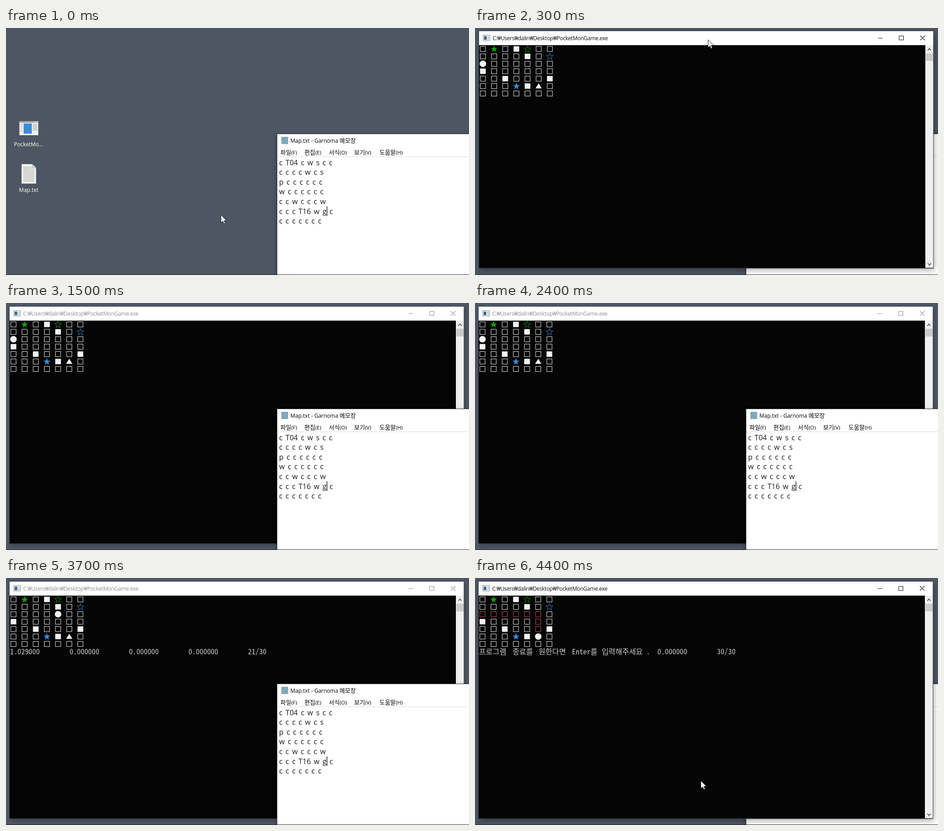
Animation, 1024 px wide and 547 px high, one loop 4500 ms. Source, as an HTML page:

```html
<!DOCTYPE html>
<html lang="ko">
<head>
<meta charset="utf-8">
<title>Map walk</title>
<style>
  html, body { margin: 0; width: 100%; height: 100%; overflow: hidden; background: #4d5662; }
  svg { display: block; width: 100vw; height: 100vh; }
  text { white-space: pre; font: 12px "Open Sans", "Noto Sans", "Noto Sans CJK KR", sans-serif; }
  .ko { font: 13px "Noto Sans CJK KR", "Noto Sans CJK", sans-serif; }
  .label { fill: #fff; text-anchor: middle; }
  .path { letter-spacing: -.3px; }
  .note { font-size: 16px; word-spacing: 2.55px; fill: #1a1a1a; }
  .term { font: 16.44px "Noto Sans Mono CJK KR", "Noto Sans CJK KR", "Noto Sans CJK", monospace; fill: #ccc; }
</style>
</head>
<body>
<svg viewBox="0 0 1024 547" preserveAspectRatio="none">
  <defs>
    <filter id="soft" x="-10%" y="-10%" width="120%" height="120%"><feGaussianBlur stdDeviation="7"/></filter>
    <filter id="tight" x="-10%" y="-10%" width="120%" height="120%"><feGaussianBlur stdDeviation="4"/></filter>
  </defs>
  <rect width="1024" height="547" fill="#4d5662"/>
  <g id="desktop"></g>
  <g id="stack">
    <g id="console">
      <rect id="shade" x="11" y="13" width="1004" height="524"/>
      <rect x="7.5" y="7.5" width="1005.5" height="525.5" fill="#050505" stroke="#3c434c"/>
      <rect x="8" y="8" width="1004.5" height="31" fill="#fff"/>
      <g id="bar">
        <text class="path" x="38" y="28" fill="currentColor">C:₩Users₩dalin₩Desktop₩PocketMonGame.exe</text>
        <path d="M890.5 23.5h10M937 18.5h9.5v9h-9.5zM984 18l10 10m0-10l-10 10" fill="none" stroke="currentColor" stroke-width="1.1"/>
      </g>
      <rect x="17" y="16.5" width="15" height="12.5" fill="#eee" stroke="#8b8f93"/>
      <rect x="19" y="19" width="6" height="8" fill="#33728f"/>
      <path d="M27 20.5h3.5m-3.5 2.5h3.5m-3.5 2.5h3.5" stroke="#aaa"/>
      <rect x="995" y="39" width="17.5" height="493" fill="#efefef"/>
      <rect x="996" y="57" width="16" height="17" fill="#cbcbcb"/>
      <path d="M1000.5 50.5l3.5-4 3.5 4M1000.5 522l3.5 4 3.5-4" fill="none" stroke="#4a4a4a" stroke-width="1.8"/>
      <g id="grid"></g>
      <g id="output"></g>
    </g>
    <g id="notepad"></g>
  </g>
  <path id="cursor" d="M0 0V17.2L4 13.5 6.6 19.4 9.3 18.2 6.8 12.4H12.2Z" fill="#fff" stroke="#161a20"/>
  <rect y="546" width="1024" height="1" fill="#20242a"/>
</svg>
<script>
const LOOP = 4500, STEP = 100;
const CELL = 8.22, COL = 24.67, ROW = 16.44;
const GREEN = "#13a10e", BLUE = "#3a8fdc", RED = "#b14f59", WHITE = "#f2f2f2";
// T: filled star, s: hollow star, w: wall, g: goal, c: clear
const MAP = ["cTcwscc", "ccccwcs", "ccccccc", "wcccccc", "ccwcccw", "cccTwgc", "ccccccc"];
const NOTE = ["c T04 c w s c c", "c c c c w c s", "p c c c c c c", "w c c c c c c",
              "c c w c c c w", "c c c T16 w g c", "c c c c c c c"];
const MENU = [[607, "파일", "F"], [660, "편집", "E"], [714, "서식", "O"], [770, "보기", "V"], [826, "도움말", "H"]];
const MESSAGE = [[0, "프로그램"], [9, "종료를"], [16, "원한다면"], [25, "Enter"], [30, "를"],
                 [33, "입력해주세요"], [45, "."]];
const GOAL = 8;

const $ = id => document.getElementById(id);
const rect = (x, y, w, h, fill, more = "") =>
  `<rect x="${x}" y="${y}" width="${w}" height="${h}" fill="${fill}" ${more}/>`;
const text = (x, y, str, cls = "") => `<text x="${x}" y="${y}" class="${cls}">${str}</text>`;
const rules = (x, y, w, gap, n, color) => {
  let d = "";
  for (let i = 0; i < n; i++) d += `M${x} ${y + i * gap}h${w}`;
  return `<path d="${d}" stroke="${color}"/>`;
};

function drawDesktop() {
  $("desktop").innerHTML =
    rect(29.5, 206.5, 42, 31, "#f1f1ef", 'stroke="#8d9194"') +
    rect(30, 207, 41, 3, "#a3a7aa") +
    rect(62, 207.5, 2, 1.5, "#fff") + rect(65.5, 207.5, 2, 1.5, "#fff") + rect(69, 207.5, 2, 1.5, "#fff") +
    rect(39, 211.5, 18, 22.5, "#3b8bd6") +
    rules(31.5, 213.5, 5.5, 4, 5, "#a8a8a8") + rules(59, 213.5, 10.5, 2.6, 6, "#9a9a9a") +
    '<path d="M34.5 301.5H58L66.5 310V344.5H34.5Z" fill="#f6f6f2" stroke="#a9aaa8"/>' +
    '<path d="M58 301.5V310H66.5" fill="#d9d9d6" stroke="#a0a09d"/>' +
    rules(38, 307.5, 18, 2.9, 2, "#9c9c9c") + rules(38, 313.3, 25, 2.9, 10, "#9c9c9c") +
    text(50, 262, "PocketMo...", "label") + text(50, 363, "Map.txt", "label");
}

function drawNotepad() {
  const menu = MENU.map(([x, name, key]) =>
    `<text x="${x}" y="279.5" class="ko">${name}<tspan style="font:11.5px 'Open Sans',sans-serif">(${key})</tspan></text>`);
  $("notepad").innerHTML =
    rect(598, 236, 440, 330, "#000", 'opacity=".3" filter="url(#tight)"') +
    rect(599.5, 234.5, 440, 330, "#fff", 'stroke="#343a42"') +
    rect(609, 241, 15, 16, "#7fa9bb") +
    text(629, 254, "Map.txt - Garnoma <tspan class='ko'>메모장</tspan>") +
    menu.join("") + rect(600, 284.3, 424, 1.6, "#e8e8e8") +
    NOTE.map((line, i) => text(604, 303.5 + i * 21.6, line, "note")).join("") +
    rect(709.2, 395, 1.3, 21, "#000");
}

function star(x, y, fill, stroke) {
  const pts = [];
  for (let i = 0; i < 10; i++) {
    const r = i % 2 ? 3.2 : 8.1, a = i * Math.PI / 5;
    pts.push((x + r * Math.sin(a)).toFixed(2) + "," + (y + .5 - r * Math.cos(a)).toFixed(2));
  }
  return `<polygon points="${pts.join(" ")}" fill="${fill}" stroke="${stroke}" stroke-width=".9"/>`;
}

function drawTile(kind, x, y, color) {
  switch (kind) {
    case "T": return star(x, y, color, "none");
    case "s": return star(x, y, "none", color);
    case "w": return rect(x - 6.3, y - 6, 12.6, 12, WHITE);
    case "g": return `<path d="M${x} ${y - 6}L${x + 7} ${y + 5.2}H${x - 7}Z" fill="${WHITE}"/>`;
    case "p": return `<circle cx="${x}" cy="${y}" r="7.2" fill="${WHITE}"/>`;
    default: return rect(x - 5.8, y - 5.7, 11.6, 11.4, "none", `stroke="${color}" stroke-width="1.1"`);
  }
}

// The walk goes five cells right, then three down.
const pathCell = k => [Math.min(k, 5), 2 + Math.max(k - 5, 0)];

function drawGrid(step, traced) {
  const [px, py] = pathCell(step);
  const trail = new Set();
  if (traced) for (let k = 0; k < GOAL; k++) trail.add(pathCell(k).join());
  let out = "";
  MAP.forEach((line, r) => [...line].forEach((kind, c) => {
    const x = 16.5 + c * COL, y = 47.4 + r * ROW;
    const starColor = c === 6 || r === 5 ? BLUE : GREEN;
    const color = kind === "T" || kind === "s" ? starColor : trail.has([c, r].join()) ? RED : "#dedede";
    out += drawTile(c === px && r === py ? "p" : kind, x, y, color);
  }));
  $("grid").innerHTML = out;
}

function drawOutput(t) {
  const put = (col, str) => text((9 + col * CELL).toFixed(2), 168.5, str, "term");
  const ticks = Math.min(30, Math.floor((t - 2671) / 49));
  let out = "";
  if (t >= 2800) {
    const zero = "0.000000";
    out = put(48, zero) + put(64, ticks + "/30");
    out += t >= 4200
      ? MESSAGE.map(([col, word]) => put(col, word)).join("")
      : put(0, (ticks * .049).toFixed(6)) + put(16, zero) + put(32, zero);
  }
  $("output").innerHTML = out;
}

function cursorAt(t) {
  if (t < 100) return [475.5, 414];
  if (t < 300) return null;
  if (t < 400) return [515.5, 26];
  if (t < 500) return [622, 205];
  return t < 4400 ? null : [499.5, 449];
}

function consoleAt(t) {
  if (t < 300) return [-118, -92];
  return t < 400 ? [1, -1] : [0, 0];
}

function render(t) {
  const noteFront = t < 100 || (t >= 500 && t < 4400);
  $("console").style.display = t < 100 ? "none" : "";
  $("console").setAttribute("transform", `translate(${consoleAt(t)})`);
  $("stack").appendChild($(noteFront ? "notepad" : "console"));
  $("bar").style.color = noteFront ? "#929292" : "#111";
  $("shade").setAttribute("filter", noteFront ? "url(#tight)" : "url(#soft)");
  $("shade").setAttribute("opacity", noteFront ? .22 : .34);

  const step = Math.max(0, Math.min(GOAL, Math.floor((t - 2920) / 160)));
  drawGrid(step, t >= 4200);
  drawOutput(t);

  const tip = cursorAt(t);
  $("cursor").style.display = tip ? "" : "none";
  if (tip) $("cursor").setAttribute("transform", `translate(${tip})`);
}

drawDesktop();
drawNotepad();
const start = performance.now();
let shown = -1;
function tick() {
  const t = Math.floor((performance.now() - start) % LOOP / STEP) * STEP;
  if (t !== shown) render(shown = t);
  requestAnimationFrame(tick);
}
tick();
</script>
</body>
</html>
```
